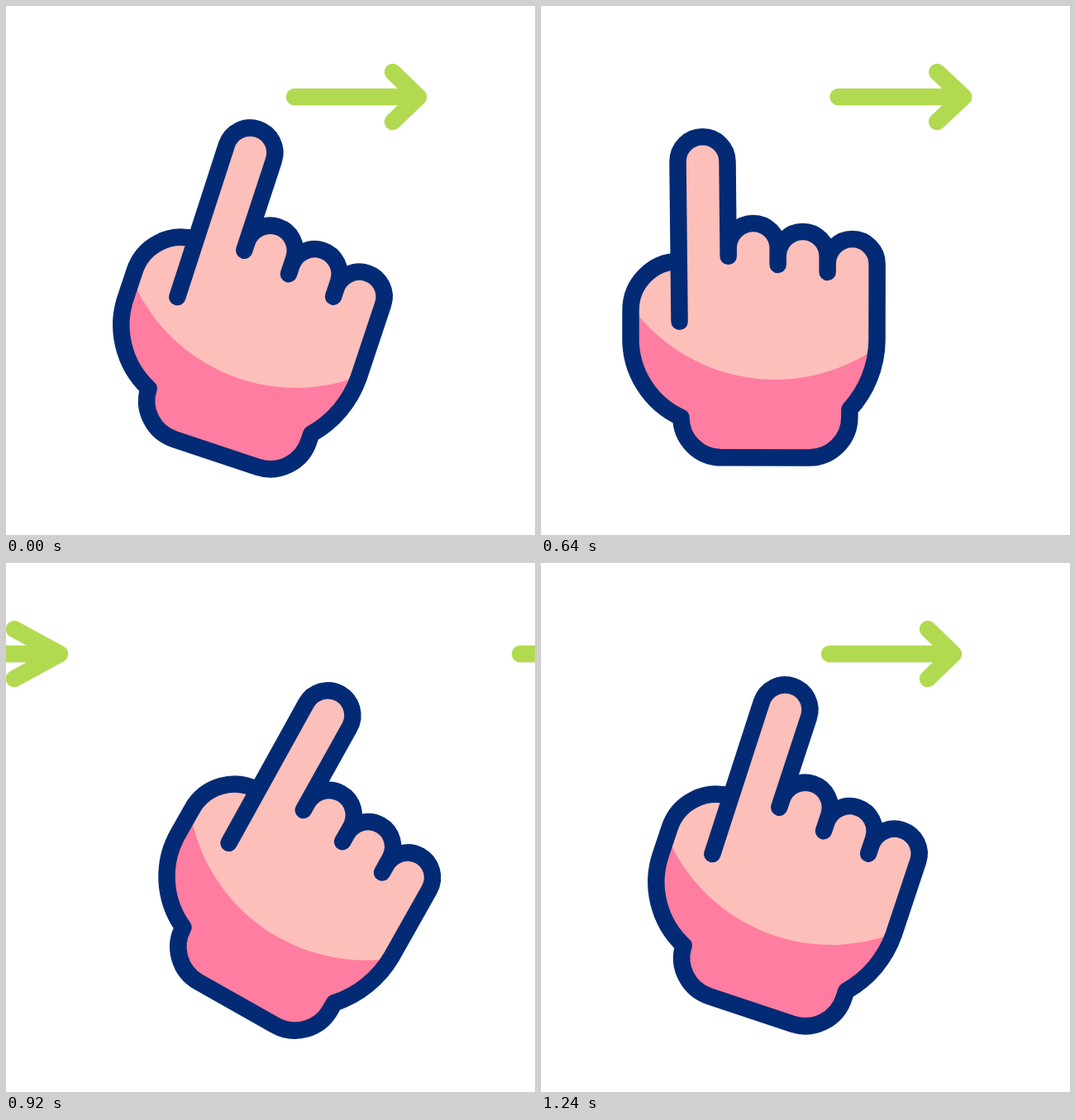
These frames come from a looping animation (640 px wide and 640 px high, 1.48 s). An HTML page with a canvas:

```html
<!DOCTYPE html>
<html lang="en">
<head>
<meta charset="utf-8">
<title>Swipe right</title>
<style>
  html, body { margin: 0; height: 100%; overflow: hidden; background: #fff; }
  canvas { display: block; }
</style>
</head>
<body>
<canvas id="stage" width="640" height="640"></canvas>
<script>
const ctx = document.getElementById('stage').getContext('2d');
const LOOP = 1480, STEP = 40;
const NAVY = '#032b75', SKIN = '#fdbfb9', PINK = '#fe7da0', GREEN = '#b1da51';

// Key times and the value of each moving part at them
const TIMES = [40, 200, 360, 480, 600, 760, 920, 1080, 1240];
const tracks = {
  angle: [18.4, 10.1, 0, -1.5, -1.5, 13.3, 29.4, 22.9, 18.4],
  x: [269.5, 268.5, 270, 270, 270, 283.5, 303.5, 285.5, 269.5],
  y: [494.5, 495.5, 497.5, 497.5, 497.5, 496.5, 490.5, 493.5, 494.5],
  bend: [0, -11, -1.5, -1, -1, 0, 0, 0, 0],
  shade: [269, 292, 278, 278, 278, 299, 274, 273, 269],
  tip: [499, 499, 499, 499, 499, 622, 802, 1041, 1236],
  length: [150, 150, 150, 150, 150, 166, 180, 172, 150],
  head: [31, 31, 31, 31, 31, 42, 55, 41, 31]
};
const ARROW_GAP = 737;

// Smooth curve through the keys that never overshoots them
function sample(values, t) {
  const last = TIMES.length - 1;
  if (t <= TIMES[0]) return values[0];
  if (t >= TIMES[last]) return values[last];
  const rate = i => (values[i + 1] - values[i]) / (TIMES[i + 1] - TIMES[i]);
  const slope = i => {
    if (i === 0 || i === last) return 0;
    const a = rate(i - 1), b = rate(i);
    return a * b > 0 ? 2 * a * b / (a + b) : 0;
  };
  const i = TIMES.findIndex(time => time > t) - 1;
  const span = TIMES[i + 1] - TIMES[i], u = (t - TIMES[i]) / span, v = 1 - u;
  return values[i] * v * v * (1 + 2 * u) + values[i + 1] * u * u * (3 - 2 * u)
    + span * u * v * (slope(i) * v - slope(i + 1) * u);
}

function handPath(bend) {
  const knuckle = (x, y, end) => `L${x} ${y}a30 30 0 0 1 60 0V${end}`;
  return new Path2D(
    `M166 382L${164.5 + bend} 188.5a30 30 0 0 1 60 0L225 303`
    + knuckle(225, 293, 313) + knuckle(285, 303, 322) + knuckle(345, 312, 405)
    + 'A126 126 0 0 1 372 488V497A49 49 0 0 1 323 546.5H217A49 49 0 0 1 168 498'
    + 'A105 105 0 0 1 107 400V368A59 59 0 0 1 165 309');
}

function drawHand(pose) {
  const path = handPath(pose.bend);
  ctx.save();
  ctx.translate(pose.x, pose.y);
  ctx.rotate(pose.angle * Math.PI / 180);
  ctx.translate(-270, -497.5);

  ctx.fillStyle = PINK;
  ctx.fill(path);
  ctx.save();
  ctx.clip(path);
  ctx.fillStyle = SKIN;
  ctx.beginPath();
  ctx.arc(pose.shade, 237, 215, 0, 2 * Math.PI);
  ctx.fill();
  ctx.restore();

  ctx.strokeStyle = NAVY;
  ctx.stroke(path);
  ctx.restore();
}

function drawArrow(tip, length, head) {
  ctx.strokeStyle = GREEN;
  ctx.stroke(new Path2D(
    `M${tip - length} 110H${tip}M${tip - head} 80L${tip} 110L${tip - head} 140`));
}

function draw(now) {
  const t = Math.floor(now % LOOP / STEP) * STEP;
  const pose = {};
  for (const name in tracks) pose[name] = sample(tracks[name], t);

  ctx.fillStyle = '#fff';
  ctx.fillRect(0, 0, 640, 640);
  ctx.lineWidth = 20.5;
  ctx.lineCap = ctx.lineJoin = 'round';
  drawArrow(pose.tip, pose.length, pose.head);
  drawArrow(pose.tip - ARROW_GAP, pose.length, pose.head);
  drawHand(pose);
}

const start = performance.now();
function tick() {
  draw(performance.now() - start);
  requestAnimationFrame(tick);
}
tick();
</script>
</body>
</html>
```
